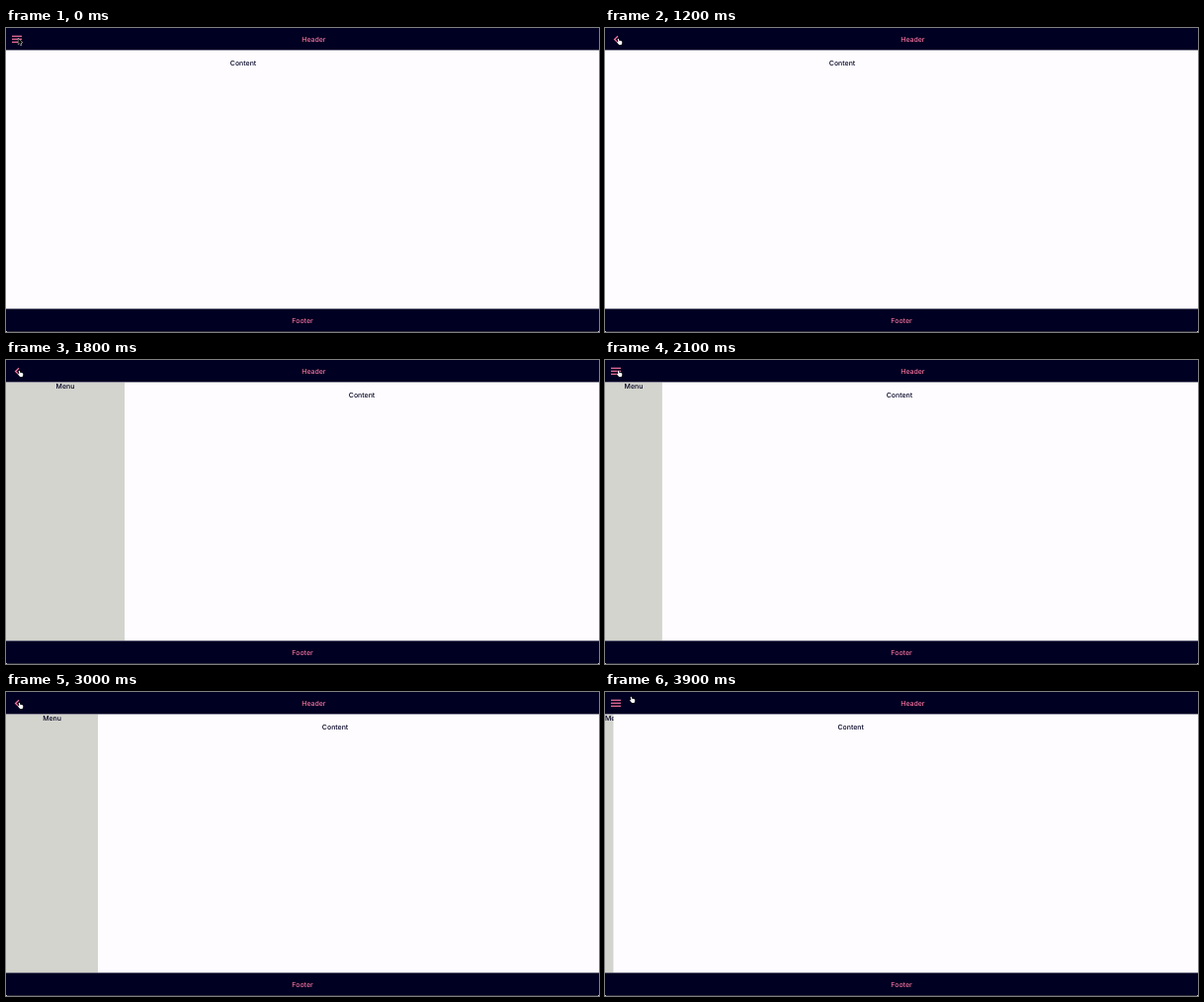
An HTML page with a canvas that plays this animation: 600x308 px, repeating every 4 s.

```html
<!DOCTYPE html>
<html lang="en">
<head>
<meta charset="utf-8">
<title>Sliding menu</title>
<style>
  html, body { margin: 0; width: 100%; height: 100%; overflow: hidden; background: #fefcff; }
  canvas { display: block; width: 600px; height: 308px; }
</style>
</head>
<body>
<canvas id="stage"></canvas>
<script>
const W = 600, H = 308, LOOP = 4000;
const BAR = 22.4, FOOT = 284.5, MENU = 120, SLIDE = 500;
const NAVY = '#000022', PINK = '#f8749f', PAPER = '#fefcff', GREY = '#d3d4cd';

// Clicks on the menu button, in ms
const toggles = [
  { at: 1200, open: true },
  { at: 1950, open: false },
  { at: 2760, open: true },
  { at: 3565, open: false }
];

const canvas = document.getElementById('stage');
const ctx = canvas.getContext('2d');
const dpr = window.devicePixelRatio || 1;
canvas.width = W * dpr;
canvas.height = H * dpr;

const clamp = v => Math.max(0, Math.min(1, v));

// The CSS "ease" curve: cubic-bezier(.25, .1, .25, 1)
function ease(x) {
  if (x <= 0 || x >= 1) return clamp(x);
  const curve = (a, b, s) => 3 * a * s * (1 - s) ** 2 + 3 * b * s * s * (1 - s) + s ** 3;
  let lo = 0, hi = 1;
  for (let i = 0; i < 24; i++) {
    const mid = (lo + hi) / 2;
    if (curve(0.25, 0.25, mid) < x) lo = mid; else hi = mid;
  }
  return curve(0.1, 1, lo);
}

function menuState(t) {
  // The icon swaps just before the panel starts to move
  const last = toggles.filter(c => c.at - 20 <= t).pop();
  if (!last) return { open: false, width: 0 };
  // The panel trails the click by a few milliseconds while opening
  const lag = last.open ? 4 : 0;
  const p = ease((t - last.at - lag) / SLIDE);
  return { open: last.open, width: MENU * (last.open ? p : 1 - p) };
}

function rect(color, x, y, w, h) {
  ctx.fillStyle = color;
  ctx.fillRect(x, y, w, h);
}

function text(str, x, y, color, align = 'center') {
  ctx.fillStyle = color;
  ctx.textAlign = align;
  ctx.fillText(str, x, y);
}

function path(points, close) {
  ctx.beginPath();
  points.forEach(([x, y]) => ctx.lineTo(x, y));
  if (close) ctx.closePath();
}

function drawIcon(open) {
  if (open) {
    path([[13, 8.3], [9.6, 11.5], [13, 14.7]]);
    ctx.strokeStyle = PINK;
    ctx.lineWidth = 1.2;
    ctx.stroke();
  } else {
    for (const y of [7.7, 10.7, 13.7]) rect(PINK, 6, y, 10, 1.2);
  }
}

function drawCursor(x, y, hand) {
  ctx.save();
  ctx.translate(x, y);
  ctx.lineJoin = 'round';
  ctx.lineWidth = 0.8;
  if (hand) {
    path([[0.7, 0.5], [1.7, 0.4], [2.3, 2.3], [4.4, 2.6], [5.3, 3.5],
      [5.2, 5.4], [4.5, 6.6], [2.2, 6.6], [0.2, 4.3], [0.3, 3.5], [1.4, 3.8]], true);
  } else {
    path([[0.4, 0], [0.4, 6], [1.8, 4.8], [2.8, 7.2], [3.8, 6.8],
      [2.8, 4.5], [4.7, 4.4]], true);
  }
  ctx.strokeStyle = hand ? '#000' : '#fff';
  ctx.fillStyle = hand ? '#fff' : '#000';
  ctx.stroke();
  ctx.fill();
  ctx.restore();
}

function draw(t) {
  const { open, width } = menuState(t);
  ctx.setTransform(dpr, 0, 0, dpr, 0, 0);
  ctx.font = '500 6.95px Inter, "Liberation Sans", sans-serif';
  ctx.textRendering = 'geometricPrecision';
  rect(PAPER, 0, 0, W, H);

  if (width > 0) {
    ctx.save();
    ctx.beginPath();
    ctx.rect(0, BAR, width, FOOT - BAR);
    ctx.clip();
    rect(GREY, 0, BAR, width, FOOT - BAR);
    const label = ctx.measureText('Menu').width;
    text('Menu', Math.max(0, (width - label) / 2), 29.4, NAVY, 'left');
    ctx.restore();
  }

  text('Content', 240 + width, 38.3, NAVY);

  rect(NAVY, 0, 0, W, BAR);
  rect(NAVY, 0, FOOT, W, H - FOOT);
  rect('#292938', 0, H - 1, W, 1);
  // Light window corners
  rect('#c4c4cc', 0, H - 1, 1, 1);
  rect('#c4c4cc', W - 1, H - 1, 1, 1);
  text('Header', 311.4, 13.6, PINK);
  text('Footer', 300, 298.6, PINK);
  drawIcon(open);

  const leave = clamp((t - 3550) / 350);
  drawCursor(12 + 13 * leave, 10.4 - 6 * leave, t >= 100);
}

function tick(now) {
  draw(now % LOOP);
  requestAnimationFrame(tick);
}
requestAnimationFrame(tick);
</script>
</body>
</html>
```
